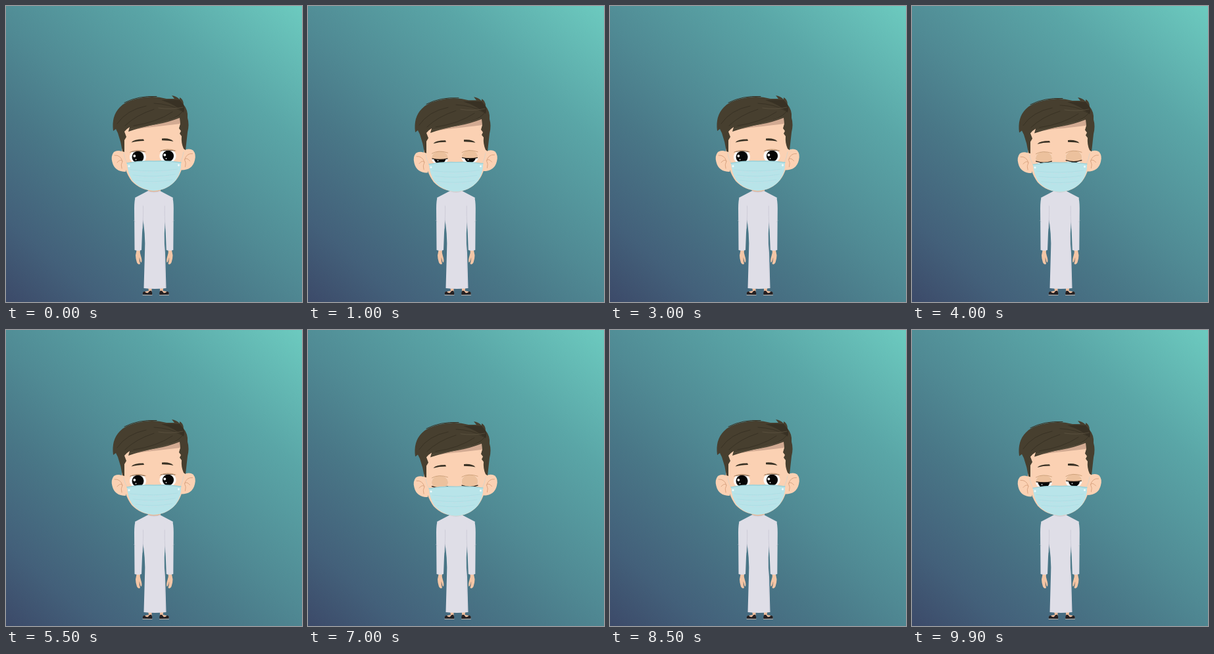
Animation of 450x450 px, one loop 10 s. Source, as an HTML page with a canvas:

```html
<!DOCTYPE html>
<html lang="en">
<head>
<meta charset="utf-8">
<title>Blinking boy</title>
<style>
html, body { margin: 0; width: 100%; height: 100%; overflow: hidden; }
canvas { display: block; width: 100%; height: 100%; }
</style>
</head>
<body>
<canvas id="stage" width="450" height="450"></canvas>
<script>
const ctx = document.getElementById('stage').getContext('2d');
const LOOP = 10000, STEP = 100;
const BLINKS = [870, 3840, 6810, 9780];
const SKIN = '#fbd1b3', LID = '#ecc19d', HAIR = '#473f2f', DARK = '#383124', ROBE = '#dfdee7';

// [ms since blink start, value]
const LID_KEYS = [[0, 0], [120, .56], [160, .88], [190, 1], [210, 1], [300, 0]];
const NOD_KEYS = [[0, 0], [120, 2], [160, 3], [190, 3], [230, -2], [280, -4], [330, -3], [430, 0]];

function track(keys, t) {
  for (let i = 1; i < keys.length; i++) {
    const [t0, a] = keys[i - 1], [t1, b] = keys[i];
    if (t >= t0 && t < t1) return a + (b - a) * (t - t0) / (t1 - t0);
  }
  return 0;
}

function fill(d, color) {
  ctx.fillStyle = color;
  ctx.fill(new Path2D(d));
}

function line(d, color, width = 1) {
  ctx.strokeStyle = color;
  ctx.lineWidth = width;
  ctx.stroke(new Path2D(d));
}

function oval(x, y, rx, ry, color) {
  ctx.beginPath();
  ctx.ellipse(x, y, rx, ry, 0, 0, Math.PI * 2);
  ctx.fillStyle = color;
  ctx.fill();
}

function background() {
  const g = ctx.createLinearGradient(0, 450, 418, -26);
  [[0, '#3c4a69'], [.15, '#43607a'], [.35, '#497787'], [.5, '#508a94'], [.75, '#5aa6a7'], [1, '#6ccabf']]
    .forEach(([p, c]) => g.addColorStop(p, c));
  ctx.fillStyle = g;
  ctx.fillRect(0, 0, 450, 450);
}

// Draws a part, then its reflection: x becomes span - x.
function mirrored(draw, span, dy = 0) {
  draw();
  ctx.save();
  ctx.translate(span, dy);
  ctx.scale(-1, 1);
  draw();
  ctx.restore();
}

function hand() {
  fill('M199 369 H204 Q203 375 205 380 Q207 386 206 390 L204.500 389 L203 383 Q202.500 388 204 392 Q201 394 199 390 Q197 384 197 379 Z', '#f3c6a6');
  line('M202.500 383 Q202.500 387 203 389', '#c99375', .6);
}

function foot() {
  fill('M216 427 H221.500 V438 H208 Q207 435 212 434 L217 433 Z', '#f0bf9e');
  fill('M208 438.500 Q207 434 211 434 Q213 437 216 436 Q218 432 221 433 Q223 436 222 439 Z', '#252022');
  line('M208 439.500 H222', '#c4b9b2', .9);
}

function body() {
  mirrored(hand, 450.5);
  mirrored(foot, 455.5);
  fill('M216 278 H235 V286 H216 Z', '#e2b393');
  fill('M216 281 Q225 284 234 281 L254 291.500 L243 318 Q239 346 242 375 L243.500 429 Q226 431 209.500 429 L211 375 Q212.500 346 207 318 L196 291.500 Z', ROBE);
  mirrored(() => {
    fill('M197 291 Q195 295 195 308 L195.500 371 Q201 373 206 371 L207 345 L209 315 V293 Z', ROBE);
    line('M208.500 304 Q209 318 207.500 338', '#c6c5d2', .7);
    line('M194.500 326 L196 328', '#a6b5bf', .7);
  }, 449.8);
  line('M216 281.500 Q225 285 234 281.500', '#cac9d5', .8);
  line('M240 350 L242.500 428', '#d0cfda', .7);
}

function ear() {
  fill('M182 224 Q171 217 164 222 Q159 228 161.500 237 Q165 252 182 252 Z', SKIN);
  line('M165 227 Q174 226 177 236 M169 238 Q174 232 177 236 Q174 241 176 247', '#dba582', 1);
}

function eye(x, y, pupilX, pupilR, k) {
  const edge = y - 8 + k * 14, bow = -2 + k * 7;
  ctx.save();
  ctx.beginPath();
  ctx.ellipse(x, y, 12.5, 10.5, 0, 0, Math.PI * 2);
  ctx.clip();
  ctx.fillStyle = '#fffdfb';
  ctx.fillRect(x - 15, y - 13, 30, 26);
  oval(pupilX, y, pupilR, pupilR, '#050505');
  oval(pupilX - 5.2, y - 1.5, 1.9, 2, '#fff');
  oval(pupilX - 3, y + 4, .9, .9, '#ddd');
  fill(`M${x - 16} ${y - 14} H${x + 16} V${edge} Q${x} ${edge + bow} ${x - 16} ${edge} Z`, LID);
  // skin fills whatever the shut lid leaves below its edge
  if (k > .95) fill(`M${x - 16} ${edge} Q${x} ${edge + bow} ${x + 16} ${edge} V${y + 14} H${x - 16} Z`, SKIN);
  ctx.restore();
  const w = 10.5 + 1.5 * k;
  line(`M${x - w} ${edge} Q${x} ${edge + bow} ${x + w} ${edge}`, k > .2 ? '#2b221b' : '#66503f', 1 + k * .4);
  line(`M${x - 12} ${y - 7} Q${x - 2} ${y - 13} ${x + 12} ${y - 8}`, '#cb9d76', .9);
}

function brows() {
  fill('M190.500 207.500 Q194 202.500 209 202.500 L210 205 Q199 205 190.500 207.500 Z', DARK);
  fill('M237 201.500 Q250 200.500 254.500 206 Q248 204.300 237 204.300 Z', DARK);
}

function mask() {
  line('M185 240 Q180 233 179 224 M265 238 Q269 230 270 222', '#dcd3c6', 1);
  fill('M184 239 Q205 235 225 236 Q246 235 266 238 Q267 252 258 265 Q245 280 224 281 Q204 279 192 265 Q185 254 184 239 Z', '#b8e4e9');
  line('M184 239 Q205 235 225 236 Q246 235 266 238', '#9bd1d8', 1.4);
  for (let i = 0; i < 3; i++) {
    const y = 249 + i * 8, inset = i * 4;
    line(`M${189 + inset} ${y} Q225 ${y + 4} ${261 - inset} ${y - 1}`, '#abdbe2', .7);
    ctx.setLineDash([7, 4]);
    line(`M${193 + inset} ${y + 2} Q225 ${y + 6} ${257 - inset} ${y + 1}`, '#c5dde6', .7);
    ctx.setLineDash([]);
  }
  oval(187, 243.5, 1.5, 1.7, '#eefafa');
  oval(262.5, 242, 1.5, 1.7, '#eefafa');
}

function hair() {
  fill('M204 185 Q235 181 264 168 L265 179 Q240 182 222 184 Q210 185 200 187 Z', '#d2aa92');
  fill('M163 190 Q160 167 173 154 Q181 145 199 141 Q222 135 244 141 L256 141 L252 136 Q259 137 264 142 L264 139 Q270 142 270 150 Q277 158 276 170 Q279 180 276 192 L273 219 L270 217 Q266 208 267 198 L264 194 L266 190 L263 186 L265 179 L264 170 Q246 177 229 180 Q206 184 186 191 L188 184 Q183 187 180 191 L183 199 L180 204 L180 222 L177 221 Q175 207 170 193 L167 187 Z', HAIR);
  fill('M236 143 Q252 142 264 143 L270 150 Q272 156 270 162 Q258 150 236 143 Z', DARK);
  line('M180 147 Q201 136 229 137.500', DARK, 1);
  line('M169 179 Q183 158 213 152 M181 182 Q197 166 225 157 M194 182 Q229 177 253 161 M225 148 Q250 149 266 159 M248 173 Q263 169 270 158', '#352f22', .8);
  line('M188 187 Q226 182 262 169 M232 155 Q251 158 269 154', '#655c48', .6);
}

function head(nod, k) {
  // squash toward a pivot below the waist, so the crown moves most
  const pivot = 500, scale = 1 - nod / (pivot - 136);
  ctx.save();
  ctx.translate(0, pivot * (1 - scale));
  ctx.scale(1, scale);
  mirrored(ear, 448.5, -2.5);
  fill('M178 176 L268 166 Q272 195 272 221 Q270 250 259 264 Q246 280 225 281 Q204 280 191 266 Q179 250 176 222 Z', SKIN);
  eye(200.5, 229.5, 200.5, 9, k);
  eye(246, 228, 246.5, 8.6, k);
  brows();
  mask();
  hair();
  ctx.restore();
}

function draw(now) {
  const t = Math.floor((now % LOOP) / STEP) * STEP;
  const start = BLINKS.filter(b => b <= t).pop();
  const age = start === undefined ? -1 : t - start;
  background();
  body();
  head(track(NOD_KEYS, age), track(LID_KEYS, age));
}

let origin;
function tick(now) {
  origin ??= now;
  draw(now - origin);
  requestAnimationFrame(tick);
}
ctx.lineCap = 'round';
draw(0);
requestAnimationFrame(tick);
</script>
</body>
</html>
```
